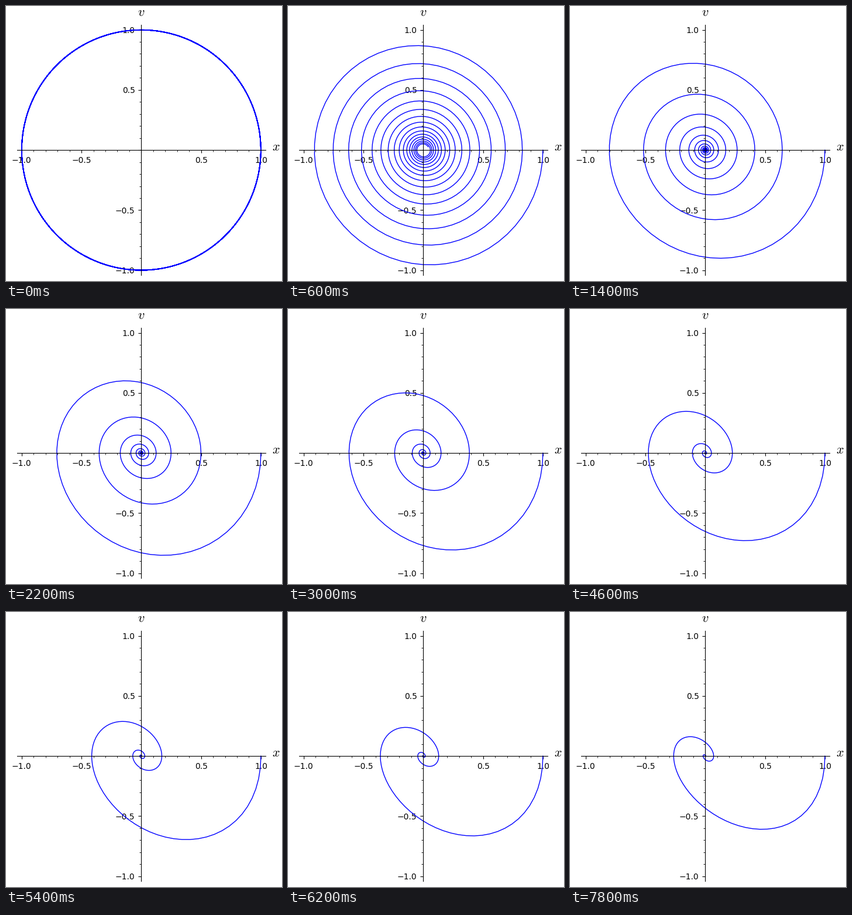
A matplotlib script that plays this animation: 472x468 px, repeating every 8000 ms.

```python
import numpy as np
import matplotlib.pyplot as plt
from matplotlib.animation import FuncAnimation
from matplotlib.ticker import FuncFormatter, MultipleLocator

W, H, DPI = 472, 468, 100
CX, CY = 231.35, 245.15    # origin of the plot, pixels from the top left
SCALE, LIM = 204.6, 1.04   # pixels per unit, half range of both axes
FRAMES, INTERVAL = 40, 200

plt.rcParams.update({
    "font.family": "DejaVu Sans",
    "font.size": 10,
    "mathtext.fontset": "cm",
    "toolbar": "None",
})

t = np.arange(0, 100.05, 0.1)


def orbit(damping):
    """Phase path of x'' + 2*damping*x' + x = 0 from x = 1, v = 0."""
    w = np.sqrt(1 - damping**2)
    decay = np.exp(-damping * t)
    x = decay * (np.cos(w * t) + damping / w * np.sin(w * t))
    v = -decay * np.sin(w * t) / w
    return x, v


def tick_label(value, pos):
    if abs(value) < 1e-9:
        return ""
    return f"{value:.1f}".replace("-", "\u2212")


fig = plt.figure(figsize=(W / DPI, H / DPI), dpi=DPI, facecolor="white")
half = SCALE * LIM
ax = fig.add_axes([(CX - half) / W, 1 - (CY + half) / H,
                   2 * half / W, 2 * half / H])
ax.set(xlim=(-LIM, LIM), ylim=(-LIM, LIM))
ax.patch.set_visible(False)

for side in ("top", "right"):
    ax.spines[side].set_visible(False)
for side in ("left", "bottom"):
    ax.spines[side].set_position(("data", 0))
for axis in (ax.xaxis, ax.yaxis):
    axis.set_major_locator(MultipleLocator(0.5))
    axis.set_minor_locator(MultipleLocator(0.1))
    axis.set_major_formatter(FuncFormatter(tick_label))
ax.tick_params(pad=4.3)

for name, px, py in (("$v$", 231.5, 17), ("$x$", 462, 246)):
    fig.text(px / W, 1 - py / H, name, fontsize=16, ha="center", va="baseline")

curve, = ax.plot([], [], color="blue", lw=1, clip_on=False)


def update(i):
    curve.set_data(*orbit(0.01 * i))
    return curve,


anim = FuncAnimation(fig, update, frames=FRAMES, interval=INTERVAL,
                     repeat=True, repeat_delay=0)
plt.show()
```
